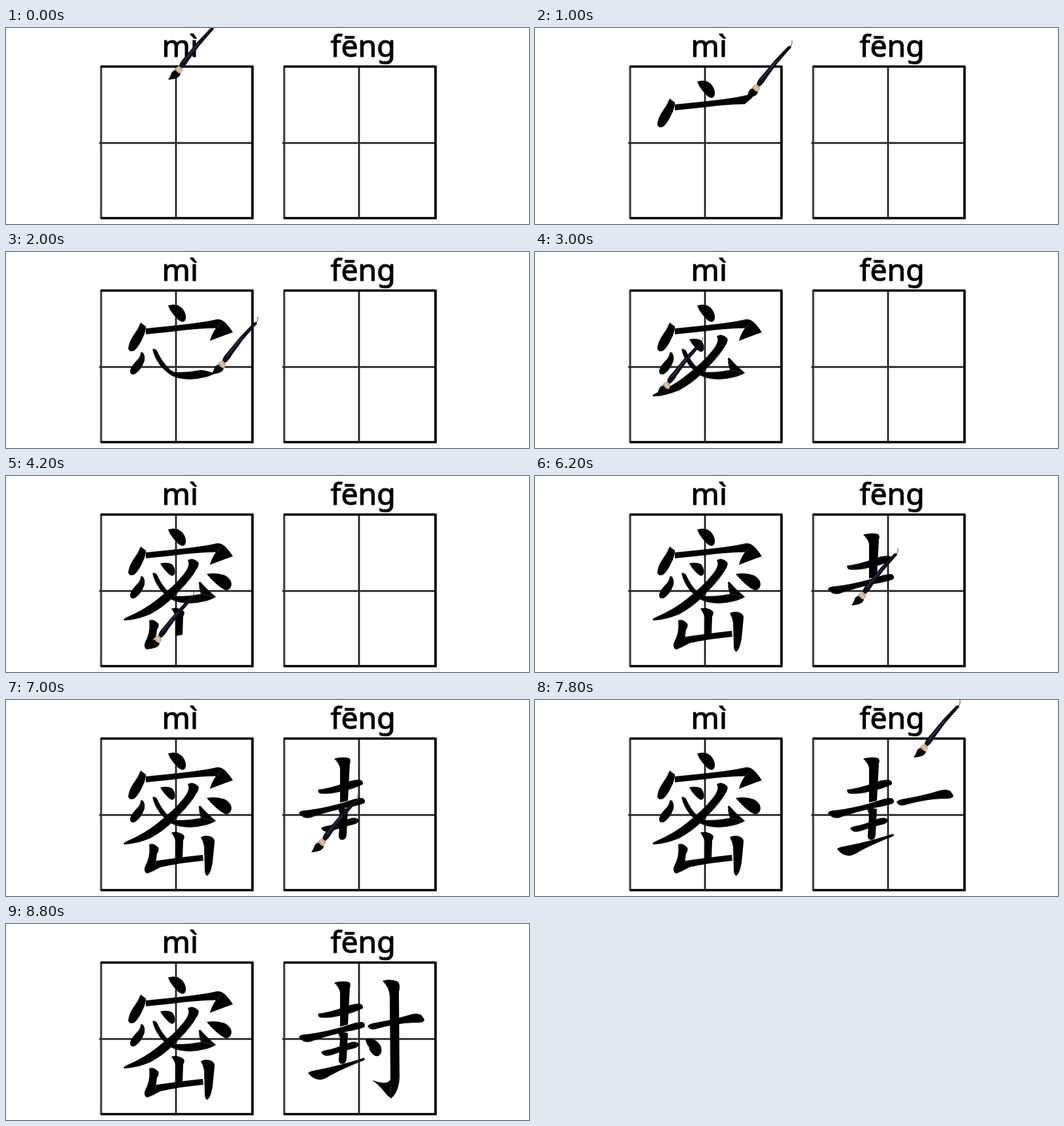
An HTML page that plays this animation: 800 px wide and 300 px high, repeating every 9000 ms.

```html
<!DOCTYPE html>
<html lang="zh">
<head>
<meta charset="utf-8">
<title>Stroke order</title>
<style>
  html, body { margin: 0; width: 100%; height: 100%; overflow: hidden; background: #fff; }
  svg { display: block; width: 100vw; height: 100vh; }
  text { font: 400 46.4px "Noto Sans", "Open Sans", sans-serif; stroke: #000; stroke-width: 1.1; }
  #ink path { visibility: hidden; }
  #ink path.on { visibility: visible; }
</style>
</head>
<body>
<svg viewBox="0 0 800 300">
  <defs>
    <g id="grid" fill="none" stroke="#000">
      <path d="M142 176H377M260 59V291M145.500 58V292" stroke="#aaa" stroke-width="4"/>
      <path d="M143 176H377M260 59V291M145.500 58V292" stroke="#222" stroke-width="2"/>
      <path d="M145 59H378M145 291H378" stroke-width="3.4"/>
      <path d="M377 58V292.500" stroke-width="3.800"/>
    </g>
  </defs>

  <text x="238.500" y="44">mì</text>
  <text x="496.500" y="44">fēng</text>
  <use href="#grid"/>
  <use href="#grid" x="280"/>

  <!-- data-from: brush set down; data-to: brush once the piece is inked -->
  <g id="ink">
    <path data-from="248,79" data-to="271,105" d="M248 82Q256 79 264 82Q273 87 275 97Q276 105 271 107Q265 107 259 99Q251 91 248 82Z"/>
    <path data-from="207,110" data-to="190,152" d="M206 108L214 114Q214 122 209 132Q202 147 196 151Q189 154 187 148Q188 137 196 126Q202 118 206 108Z"/>
    <path data-from="214,122" data-to="322,107" d="M214 117L262 112Q300 108 318 104Q327 101 333 106L321 116.500Q290 117 262 121L214 126Z"/>
    <path data-to="313,135" d="M333 106Q341 113 347 123Q335 127 312 136Q314 127 321 116.500Z"/>
    <path data-from="208,155" data-to="192,186" d="M208 153Q213 156 212 166Q207 181 197 187Q189 189 190 181Q192 174 200 166Q206 160 206 154Z"/>
    <path data-from="228,150" data-to="314,187" d="M224 149Q228 147 231 151Q238 167 249 178Q254 184 262 184Q281 184 298 180.500Q308 181.500 320 186Q304 194 282 195Q263 195 253 189Q230 174 224 149Z"/>
    <path data-to="297,165" d="M295 163Q297 160 300 165Q309 175 321 185L320 186Q308 181.500 298 180.500Q295 172 295 163Z"/>
    <path data-from="237,135" data-to="255,152" d="M236 134Q245 131 254 135Q260 142 258 150Q255 155 250 151Q241 143 236 134Z"/>
    <path data-from="287,135" data-to="185,219" d="M278 129Q285 124 293 131Q297 134 292 142Q283 158 264 177Q245 199 220 212Q197 221 181 221Q178 220 183 217Q213 204 231 189Q255 171 272 150Q283 136 278 129Z"/>
    <path data-from="310,152" data-to="340,173" d="M307 150Q321 147 335 152Q345 158 345 166Q344 174 337 175Q326 172 307 150Z"/>
    <path data-from="257,203" data-to="265,243" d="M253 203Q263 200 272 207Q274 210 271 215L270 243L259 245L260 217Q258 210 253 203Z"/>
    <path data-from="222,222" data-to="216,265" d="M219 221Q226 218 233 226Q235 230 231 235L229 250Q226 260 220 264Q214 268 212 261Q211 258 214 252Q221 238 219 221Z"/>
    <path data-to="302,241" d="M230 246Q265 241 301 237L302 246Q262 250 236 256L221 264Q228 256 230 246Z"/>
    <path data-from="303,210" data-to="310,268" d="M298 210Q305 206 313 209Q320 212 319 218L316 249Q313 266 308 269Q304 268 304 260L303 224Q302 217 298 210Z"/>

    <path data-from="479,140" data-to="545,126" d="M478 137Q495 135 515 128Q532 121 541 122Q547 124 546 129Q535 135 517 139Q493 145 480 143Q476 140 478 137Z"/>
    <path data-from="503,93" data-to="515,156" d="M502 90Q514 86 525 89Q528 92 526 97L523 154L511 157L511 105Q510 97 502 90Z"/>
    <path data-from="450,175" data-to="545,158" d="M448 173Q450 169 458 169Q490 165 519 156Q538 149 545 150Q551 153 548 158Q538 162 520 165Q488 172 466 180Q455 183 448 173Z"/>
    <path data-from="484,198" data-to="538,185" d="M482 196Q486 193 495 192Q510 188 524 182Q535 178 539 183Q541 187 534 190Q516 194 500 200Q486 205 482 196Z"/>
    <path data-from="512,170" data-to="515,213" d="M508 167Q516 164 523 167L521 205Q521 214 514 214Q509 214 509 208L511 175Z"/>
    <path data-from="467,233" data-to="545,207" d="M462 228Q465 225 473 224Q510 217 547 205Q551 206 547 209Q518 220 496 232Q484 240 477 238Q468 236 462 228Z"/>
    <path data-from="554,158" data-to="630,150" d="M553 156Q557 152 566 151Q594 146 614 140Q627 135 635 139L640 146Q640 151 630 151Q610 151 590 155Q575 158 565 161Q556 163 553 156Z"/>
    <path data-from="579,88" data-to="594,262" d="M576 87Q588 83 599 88Q604 92 601 104L602 235Q601 257 589 267L588 238L587 110Q586 97 576 87Z"/>
    <path data-to="562,242" d="M560 239Q568 242 577 243Q586 243 588 238L589 267Q583 263 578 256Q570 246 560 239Z"/>
    <path data-from="553,175" data-to="568,200" d="M550 176Q561 174 569 181Q576 188 574 197Q570 205 563 201Q556 196 555 188Q550 182 550 176Z"/>
  </g>

  <g id="brush">
    <path d="M68 -78Q72 -81 71 -88" fill="none" stroke="#445" stroke-width="1"/>
    <path d="M17 -21Q18 -27 25 -34L45 -58L65 -79L69 -80L70 -77L67 -74L48 -52L32 -30Q27 -21 21 -17Z" fill="#12121e"/>
    <path d="M23 -27L47 -56" stroke="#50536b"/>
    <path d="M8 -13Q11 -19 17 -21L22 -16Q22 -11 18 -8Z" fill="#c9ab8c"/>
    <path d="M14 -18L20 -11" stroke="#ecd9c2" stroke-width="1.500"/>
    <path d="M0 0Q4 -6 5 -10Q8 -15 12 -14Q14 -10 19 -9Q18 -4 12 -2Q6 0 0 0Z" fill="#080606"/>
  </g>
</svg>
<script>
  const STEP = 200;
  const brush = document.getElementById('brush');
  const pieces = [...document.querySelectorAll('#ink path')];
  const steps = [];

  pieces.forEach((piece, i) => {
    const { from, to } = piece.dataset;
    if (from) steps.push({ tip: from, inked: i });
    steps.push({ tip: to, inked: i + 1 });
  });
  steps.push({ tip: null, inked: pieces.length });

  let shown = -1;
  function draw() {
    const n = Math.floor(performance.now() / STEP) % steps.length;
    if (n !== shown) {
      const { tip, inked } = steps[shown = n];
      pieces.forEach((piece, i) => piece.classList.toggle('on', i < inked));
      brush.style.display = tip ? '' : 'none';
      if (tip) brush.setAttribute('transform', `translate(${tip})`);
    }
    requestAnimationFrame(draw);
  }
  draw();
</script>
</body>
</html>
```
